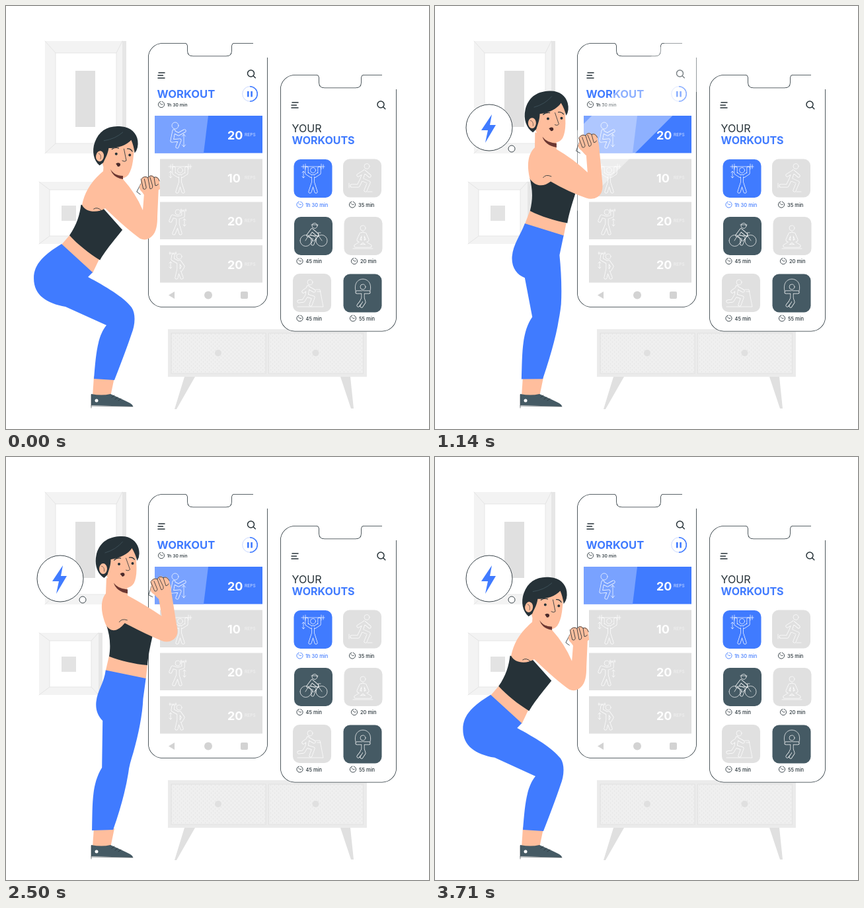
Recreate the animation shown at these times as an HTML page. Size 640 by 640 pixels, loop 3.87 s.

```html
<!DOCTYPE html>
<html lang="en">
<head>
<meta charset="utf-8">
<title>Workout app</title>
<style>
  html, body { margin: 0; height: 100%; overflow: hidden; background: #fff; }
  svg { display: block; width: 100vw; height: 100vh; font-family: Inter, sans-serif; }
  .thin { fill: none; stroke: #263238; stroke-width: .8; stroke-linecap: round; stroke-linejoin: round; }
  .tool { fill: none; stroke: #263238; stroke-width: 1.5; stroke-linecap: round; }
  .icon { fill: none; stroke: #fff; stroke-width: .7; stroke-linecap: round; stroke-linejoin: round; }
  .skin { fill: #ffbe9d; }
  .dark { fill: #263238; }
  .blue { fill: #407bff; }
  .bold { font-weight: 700; }
</style>
</head>
<body>
<svg id="stage" viewBox="0 0 640 640"></svg>
<script>
const BLUE = '#407bff', GREY = '#e0e0e0', SLATE = '#455a64', DARK = '#263238';

// ---------- markup helpers ----------
const rect = (x, y, w, h, fill, more = '') =>
  `<rect x="${x}" y="${y}" width="${w}" height="${h}" fill="${fill}" ${more}/>`;
const circle = (x, y, r, more = '') => `<circle cx="${x}" cy="${y}" r="${r}" ${more}/>`;
const path = (d, more = '') => `<path d="${d}" ${more}/>`;
const text = (x, y, size, str, fill = DARK, more = '') =>
  `<text x="${x}" y="${y}" font-size="${size}" fill="${fill}" ${more}>${str}</text>`;

// Clockwise from the right side; the top right corner of the line stays open.
const phoneShape = (x, y, w, h, a, b) =>
  `M${x + w} ${y + 22}V${y + h - 22}a22 22 0 0 1-22 22H${x + 22}a22 22 0 0 1-22-22V${y + 22}a22 22 0 0 1 22-22` +
  `H${a}q4 0 4 7v5q0 7.5 8 7.5H${b - 12}q8 0 8-7.5v-5q0-7 4-7H${x + w - 22}`;

const toolbar = (x, y, sx, sy) =>
  path(`M${x + 1} ${y}h9M${x} ${y + 4}h7.5M${x} ${y + 8}h10`, 'class="tool"') +
  circle(sx, sy, 5, 'class="tool"') + path(`M${sx + 3.8} ${sy + 3.8}l3 3`, 'class="tool"');

const duration = (x, y, label, tx, size = 7.5, color = DARK) =>
  circle(x, y, 4.6, `class="thin" style="stroke:${color}" stroke-dasharray="26 3" transform="rotate(-75 ${x} ${y})"`) +
  path(`M${x - 2} ${y - 2}l2.2 2.2 2-.4`, `class="thin" style="stroke:${color}"`) +
  text(tx, y + 3, size, label, color, 'font-weight="500"');

// Outlined stick figure: wide white limbs with a narrower core in the tile colour.
const figure = (core, hx, hy, limbs, extra = '', r = 4) =>
  `<g class="icon">${circle(hx, hy, r)}${path(limbs, 'stroke-width="5"')}` +
  `${path(limbs, `stroke="${core}" stroke-width="3.6"`)}${path(extra)}</g>`;

const lifter = core => figure(core, 263.5, 248.5,
  'M254 245V253L260 257M273 245V253L267 257M263.5 257V267L259 281M263.5 267L268 281',
  'M246 243H281M249 240v6M252 239v8M276 239v8M279 240v6M249 250v10m-2-2l2 2 2-2m-4-6l2-2 2 2');

const tile = (x, y, fill) => rect(x, y, 58, 58, fill, 'rx="10"');

// ---------- scenery ----------
const pictures = `
  ${rect(59, 53, 123, 170, '#e6e6e6')}${rect(59, 53, 117, 170, '#f3f3f3')}
  ${path('M59 53l16 18M176 53l-9 18M59 223l16-15M176 223l-9-15', 'class="thin" style="stroke:#e0e0e0"')}
  ${rect(75, 71, 92, 137, '#fff', 'stroke="#e6e6e6"')}${rect(105, 98, 30, 85, GREY)}
  ${rect(50, 266, 96, 94, '#e6e6e6')}${rect(50, 266, 90, 94, '#f3f3f3')}
  ${path('M50 266l16 12M140 266l-11 12M50 360l16-12M140 360l-11-12', 'class="thin" style="stroke:#e0e0e0"')}
  ${rect(66, 278, 63, 70, '#fff', 'stroke="#e6e6e6"')}${rect(84, 302, 22, 23, '#e3e3e3')}`;

const drawer = x => rect(x, 495, 143, 61, '#efefef', 'stroke="#e2e2e2"') +
  rect(x, 495, 143, 61, 'url(#dots)') + circle(x + 71, 525, 5, 'fill="#e0e0e0"');
const cabinet = path('M270 561h16L258 610h-3zM506 561h15l5 48h-4z', 'fill="#e0e0e0"') +
  rect(245, 489, 301, 72, '#ebebeb') + drawer(250) + drawer(397.5);

// ---------- phones ----------
const reps = (y, count, color) =>
  text(335, y + 7, 18, count, '#fff', 'class="bold"') + text(361, y + 2, 6.6, 'REPS', color);

const listScreen = `
  ${toolbar(230, 101, 370.5, 102)}
  ${text(228.5, 139, 16.6, 'WORKOUT', BLUE, 'class="bold"')}
  ${duration(235, 149, '1h 30 min', 243.5, 6.8)}
  ${circle(369, 133, 11.3, 'fill="none" stroke="#c9d8ff"')}
  ${path('M369 121.7a11.3 11.3 0 0 1 0 22.6', 'fill="none" stroke="#407bff" stroke-width="1.6"')}
  ${rect(365, 129, 2.6, 8.5, BLUE)}${rect(370.3, 129, 2.6, 8.5, BLUE)}
  ${rect(225, 166, 163, 56.5, BLUE)}${path('M225 166H306L299 222.5H225z', 'fill="#79a2ff"')}
  ${reps(194.5, '20', '#d5e1ff')}
  ${[[231.5, '10'], [296.5, '20'], [362, '20']].map(([y, n]) =>
    rect(233, y, 155, 56.5, GREY) + reps(y + 28.5, n, '#f2f2f2')).join('')}
  ${figure('#79a2ff', 256, 181, 'M254 189L251 204L263 203L259 213M255 191L261 194L270 189',
    'M269 194v19m-2.5-3l2.5 3 2.5-3m-5-13l2.5-3 2.5 3', 5)}
  ${lifter(GREY)}
  ${figure(GREY, 260, 312, 'M260 320V330L254 344M260 330L264 344M258 320L252 318L249 325M262 320L268 318L268 312',
    'M264 309h9M265 307v4M272 307v4M270 322v11m-2-2l2 2 2-2m-4-7l2-2 2 2')}
  ${figure(GREY, 262, 379, 'M261 387V398L258 411M261 398L266 411M259 387L252 383L253 377M263 387L268 394L265 399',
    'M247 374h11M248 372v4M257 372v4M249 387v10m-2-2l2 2 2-2m-4-6l2-2 2 2')}
  ${path('M246 437.5l9-5.5v11z', 'fill="#d3d3d3"')}${circle(306, 437.5, 6, 'fill="#d3d3d3"')}
  ${rect(355, 432, 11, 11, '#d3d3d3', 'rx="2"')}`;

const gridScreen = `
  ${toolbar(432, 146, 567, 149)}
  ${text(432.5, 191, 16.1, 'YOUR')}${text(432.5, 209, 16, 'WORKOUTS', BLUE, 'class="bold"')}
  ${tile(435.5, 232, BLUE)}<g transform="translate(201 0)">${lifter(BLUE)}</g>
  ${tile(510, 231.5, GREY)}
  ${figure(GREY, 546, 242.5, 'M542 250L538 262L549 267L544 279M538 262L533 272L523 272M541 251L533 256M543 251L550 257', 'M547 281h7M519 268v7')}
  ${tile(436, 319, SLATE)}
  ${figure(SLATE, 467, 332.5, 'M463 339L457 347L467 351L464 360M464 340L471 346',
    'M445 355a8.5 8.5 0 1 0 17 0a8.5 8.5 0 1 0-17 0M469 355a8.5 8.5 0 1 0 17 0a8.5 8.5 0 1 0-17 0M453 355l5-8 15 1 5 7M458 348l7 8 8-8-1-5h4M462 331h10')}
  ${tile(511.5, 319, GREY)}
  ${figure(GREY, 540, 336, 'M540 344V356M537 345L533 354L538 357M543 345L547 354L542 357M537 358L529 363H551L543 358', 'M525 367h30')}
  ${tile(434, 405, GREY)}
  ${figure(GREY, 460, 418, 'M457 425L455 438L465 441L461 452M455 438L450 446L443 447M457 427L450 432M459 427L466 431', 'M441 455h39l-5-26h-6M471 432h5')}
  ${tile(510.5, 405.5, SLATE)}
  ${figure(SLATE, 540, 425, 'M540 433V442L537 448L533 453M540 442L542 448L538 454M539 433L531 433M541 433L549 433', 'M529 431C523 407 557 407 551 431')}
  ${duration(444.5, 300.5, '1h 30 min', 453, 7.5, BLUE)}
  ${duration(524, 300.5, '35 min', 533)}
  ${duration(444.5, 386, '45 min', 453.5)}
  ${duration(527, 386, '20 min', 536)}
  ${duration(444.5, 472.5, '45 min', 453.5)}
  ${duration(525, 472.5, '55 min', 534)}`;

const phone = (id, shape, screen) => `
  <clipPath id="${id}Clip">${path(shape)}</clipPath>
  ${path(shape, 'fill="#fff"')}
  <g clip-path="url(#${id}Clip)">${path(shape, 'class="thin" style="stroke-width:1.6;stroke-linecap:butt"')}${screen}
    ${path('M0 0H122L-518 640H-640z', `id="${id}Shine" fill="#fff" opacity=".4"`)}</g>`;

// ---------- woman ----------
const foot = `
  ${path('M133 560L164 562L158 591H131z', 'class="skin"')}
  ${path('M129 587Q145 590 158 587Q174 594 186 600Q192 603 192 606L129 604z', `fill="${SLATE}"`)}
  ${path('M129 588V608M129 605L192 606', 'class="thin" style="stroke-width:.6"')}
  ${path('M160 592l4-3M165 595l4-3M170 597l4-3', 'class="thin"')}
  ${circle(137, 597, 2.5, 'fill="#fff"')}`;

const shirt = `<g transform="translate(-157 -301)">
  ${path('M152 252C157 266 160 282 157 301C175 308 195 312 215 314C216 300 219 285 225 258L180 240z', 'class="dark"')}</g>`;
const crease = `<g transform="translate(-157 -301)">${path('M172 249Q175 243 184 246', 'class="thin"')}</g>`;

const head = `<g transform="translate(-177 -177)">
  ${path('M152 150L150 172C152 184 160 194 178 197Q188 198 193 190Q197 182 197 168L196 138L170 130z', 'class="skin"')}
  ${path('M148 182C138 176 133 162 136 148C140 130 152 120 172 119C187 118 197 126 200 137Q203 148 198 156Q195 145 190 137C184 146 172 152 158 154C158 163 155 170 153 177z', 'class="dark"')}
  ${path('M149 144Q166 139 176 127', `fill="none" stroke="${SLATE}" stroke-width=".7"`)}
  <ellipse cx="146.5" cy="168" rx="6" ry="8" class="skin"/>
  ${path('M144 164q5 1 4 8', 'class="thin" style="stroke-width:.6"')}
  ${circle(170.5, 161, 2, 'class="dark"')}${circle(191, 160, 2, 'class="dark"')}
  ${path('M163 155Q167 151 173 152M186 151Q191 150 194 154', 'class="thin" style="stroke-width:1.2"')}
  ${path('M181 152L187 169Q185 172 181 170', 'class="thin"')}
  ${path('M172 176Q175 173 178 174.5Q180 177 178 179Q175 181 174 178z', 'fill="#4a2a2a"')}</g>`;

const hand = `<g transform="translate(-238 -205)">
  ${path('M220 195L216 208L222 211', 'class="thin"')}
  ${path('M231 214L224 207C219 204 217 200 220 196L219 188C221 183 226 181 229 184C231 179 236 178 238 182C241 179 246 181 247 186L250 198z', 'class="skin"')}
  ${path('M220 187Q223 182 229 184Q232 178 238 182Q243 179 247 186M219 188L225 202Q229 203 229 199L224 187M229 184L235 200Q239 200 238 195L232 183M238 182L242 194Q245 194 246 191', 'class="thin"')}</g>`;

// Squat, middle and standing pose of every moving part.
const poses = {
  waist: ['M97 346L141 383L131 404L84 361z', 'M122 326L172 353L165 372L111 343z', 'M157 300L215 314L213 335L152 323z'],
  pants: [
    'M84 360L131 403L124 410C150 424 178 440 190 456C197 466 195 484 190 496Q182 520 164 566L133 564C136 528 138 500 152 483L90 455C62 450 42 438 42 412C42 390 58 376 84 360z',
    'M111 342L165 371L157 394C168 416 182 436 189 456C192 468 190 482 187 492Q180 518 164 565L132 564C134 528 134 494 150 474L116 432C96 430 81 416 82 394C83 374 96 358 111 342z',
    'M152 322L213 334L209 365C208 388 201 420 193 446C189 458 186 468 185 478Q179 516 162 564L130 565C131 526 129 496 145 470L147 398C140 390 137 382 138 370C140 352 150 342 152 322z'],
  arm: [
    'M148 238L147 250C128 266 119 282 115 301C120 312 138 314 150 306Q182 337 203 352Q212 356 220 349C228 342 229 330 229 318L231 272L209 283L207 309Q196 283 177 262L177 246z',
    'M150 210L150 229C136 240 130 255 130 277C138 288 152 293 165 287Q190 306 217 316Q226 319 234 314C242 308 243 298 243 286L243 237L222 249L221 275Q204 250 182 234L182 216z',
    'M152 182L151 206C143 216 143 234 152 254C160 266 170 263 180 250Q212 267 236 277Q246 281 254 275C261 270 261 263 258 250L249 196L231 212L236 240Q212 224 184 209L183 190z'],
  shade: [
    'M158 247Q164 257 177 257L177 262Q162 260 158 247z',
    'M161 216Q167 225 182 226L182 232Q165 229 161 216z',
    'M163 190Q169 199 184 200L184 206Q167 203 163 190z'],
  shirt: ['translate(96 347)rotate(26.5)', 'translate(122 326)rotate(14.8)', 'translate(157 301)rotate(0)'],
  head: ['translate(171 240.5)rotate(8)', 'translate(175.5 207)rotate(3)', 'translate(177.5 177.5)rotate(0)'],
  hand: ['translate(220 282)rotate(10)', 'translate(230 243)rotate(7)', 'translate(238 205)rotate(0)'],
};
poses.crease = poses.shirt;

const stage = document.getElementById('stage');
stage.innerHTML = `
  <defs><pattern id="dots" width="6" height="6" patternUnits="userSpaceOnUse">
    <circle cx="1.5" cy="1.5" r=".7" fill="#e0e0e0"/><circle cx="4.5" cy="4.5" r=".7" fill="#e0e0e0"/></pattern></defs>
  ${pictures}${cabinet}
  ${phone('list', phoneShape(215, 56, 181, 400, 271, 345), listScreen)}
  ${phone('grid', phoneShape(415, 104, 176, 388.5, 470, 541), gridScreen)}
  <g id="bubble">
    <circle cx="82" cy="184" r="35" fill="#fff" stroke="${DARK}" stroke-width=".9"/>
    <circle cx="116" cy="216" r="5" fill="#fff" stroke="${DARK}" stroke-width=".9"/>
    ${path('M86 164L70 188H80L76 207L92 180H83z', 'class="blue"')}
  </g>
  ${foot}
  ${path('', 'id="waist" class="skin"')}
  <g id="shirt">${shirt}</g>
  ${path('', 'id="pants" class="blue"')}
  ${path('', 'id="arm" class="skin"')}
  <g id="crease">${crease}</g>
  <g id="head">${head}</g>
  ${path('', 'id="shade" fill="#6b3732"')}
  <g id="hand">${hand}</g>`;

// ---------- motion ----------
const LOOP = 3870, STEP = 1000 / 14, MIDDLE = .43, NUMBER = /[\d.]+/g;
const part = id => document.getElementById(id);
const ramp = (t, from, to) => Math.min(1, Math.max(0, (t - from) / (to - from)));
const ease = (t, from, to) => (1 - Math.cos(Math.PI * ramp(t, from, to))) / 2;

// Quadratic through the three poses, applied to every number in the string.
function blend(keys, p) {
  const weights = [
    (p - MIDDLE) * (p - 1) / MIDDLE,
    p * (1 - p) / (MIDDLE * (1 - MIDDLE)),
    p * (p - MIDDLE) / (1 - MIDDLE),
  ];
  const values = keys.map(key => key.match(NUMBER));
  let i = 0;
  return keys[0].replace(NUMBER, () => {
    const v = weights.reduce((sum, w, k) => sum + w * values[k][i], 0);
    i++;
    return v.toFixed(2);
  });
}

function draw(t) {
  const p = ease(t, -30, 1660) - ease(t, 2390, 3765);
  for (const id in poses) {
    const attribute = poses[id][0][0] === 'M' ? 'd' : 'transform';
    part(id).setAttribute(attribute, blend(poses[id], p));
  }
  part('bubble').setAttribute('opacity', ramp(t, 600, 1070));
  part('listShine').setAttribute('transform', `translate(${150 + 700 * ease(t, 736, 1726)} 0)`);
  part('gridShine').setAttribute('transform', `translate(${402 + 673 * ease(t, 1120, 2110)} 0)`);
}

function tick() {
  const t = performance.now() % LOOP;
  draw(Math.min(52, Math.floor(t / STEP + .05)) * STEP);
  requestAnimationFrame(tick);
}
tick();
</script>
</body>
</html>
```
